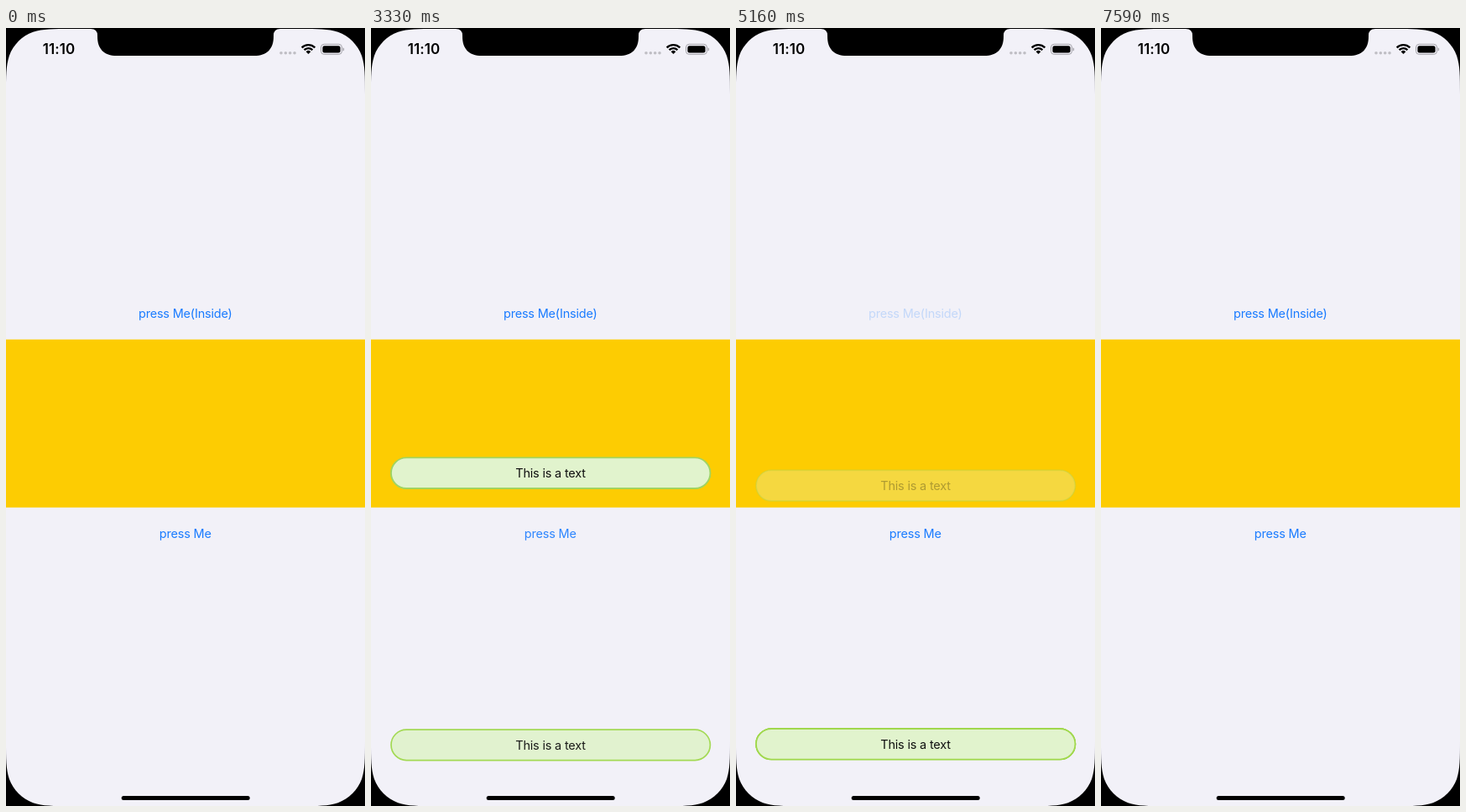
Animation, 428 px wide and 926 px high, one loop 7980 ms. Source, as an HTML page with a canvas:

```html
<!DOCTYPE html>
<html lang="en">
<head>
<meta charset="utf-8">
<title>Toast demo</title>
<style>
  html, body { margin: 0; width: 100%; height: 100%; overflow: hidden; background: #000; }
  canvas { display: block; width: 428px; height: 926px; }
</style>
</head>
<body>
<canvas id="stage"></canvas>
<script>
const W = 428, H = 926, LOOP = 7980;
const BG = '#f2f1f8', BLUE = '#197bff';
const FONT = 'Inter, Roboto, sans-serif';
const ENTER = 300, SLIDE = 21.5;

const canvas = document.getElementById('stage');
const ctx = canvas.getContext('2d');
const dpr = window.devicePixelRatio || 1;
canvas.width = W * dpr;
canvas.height = H * dpr;

// Each toast: start of entry, start of exit, length of exit (ms).
const inner = {
  y: 529.7, border: '#a0d462',
  toasts: [[1380, 3750, 350], [1805, 3890, 280], [5044, 7230, 350]]
};
const outer = {
  y: 852.3, border: '#a0d84c',
  toasts: [[3078, 5260, 350], [3800, 6083, 350], [4115, 6370, 240]]
};

const clamp = x => Math.max(0, Math.min(1, x));
const ease = x => x < 0.5 ? 2 * x * x : 1 - 2 * (1 - x) * (1 - x);

function shown(t, [start, end, exit]) {
  return ease(clamp((t - start) / ENTER)) * (1 - ease(clamp((t - end) / exit)));
}

// A tap dims the label quickly, then lets it recover.
function labelAlpha(t, toasts) {
  return Math.min(...toasts.map(([start]) => {
    const d = t - start;
    if (d < 0 || d > 270) return 1;
    return d < 115 ? 1 - 0.8 * d / 115 : 0.2 + 0.8 * (d - 115) / 155;
  }));
}

function text(str, x, y, color, size = 14.5, weight = 400, spacing = -0.2) {
  ctx.font = `${weight} ${size}px ${FONT}`;
  ctx.letterSpacing = spacing + 'px';
  ctx.textAlign = 'center';
  ctx.textBaseline = 'alphabetic';
  ctx.fillStyle = color;
  ctx.fillText(str, x, y);
}

function pill(x, y, w, h, r) {
  ctx.beginPath();
  ctx.roundRect(x, y, w, h, r);
}

// One smooth screen corner; sx and sy mirror it into place.
function corner(cx, cy, sx, sy) {
  const r = 51;
  const p = (x, y) => [cx + sx * x * r, cy + sy * y * r];
  ctx.beginPath();
  ctx.moveTo(...p(-0.1, -0.1));
  ctx.lineTo(...p(1.529, -0.1));
  ctx.lineTo(...p(1.529, 0));
  ctx.bezierCurveTo(...p(1.089, 0), ...p(0.868, 0), ...p(0.632, 0.075));
  ctx.bezierCurveTo(...p(0.373, 0.169), ...p(0.169, 0.373), ...p(0.075, 0.632));
  ctx.bezierCurveTo(...p(0, 0.868), ...p(0, 1.089), ...p(0, 1.529));
  ctx.lineTo(...p(-0.1, 1.529));
  ctx.fill();
}

function drawBezel() {
  ctx.fillStyle = '#000';
  ctx.fillRect(0, 0, W, 1);
  corner(0, 1, 1, 1);
  corner(W, 1, -1, 1);
  corner(0, H, 1, -1);
  corner(W, H, -1, -1);

  ctx.beginPath();
  ctx.moveTo(101, 0);
  ctx.lineTo(101, 1);
  ctx.quadraticCurveTo(109, 1, 109, 9);
  ctx.lineTo(109, 10);
  ctx.bezierCurveTo(109, 25, 117, 33, 132, 33);
  ctx.lineTo(296, 33);
  ctx.bezierCurveTo(311, 33, 319, 25, 319, 10);
  ctx.lineTo(319, 9);
  ctx.quadraticCurveTo(319, 1, 327, 1);
  ctx.lineTo(327, 0);
  ctx.fill();
}

function drawStatus() {
  text('11:10', 63, 31.3, '#000', 17, 600, 0.1);

  ctx.fillStyle = '#bfbec4';
  for (let i = 0; i < 4; i++) {
    ctx.beginPath();
    ctx.arc(328 + i * 5.35, 29.7, 1.8, 0, 7);
    ctx.fill();
  }

  const up = -Math.PI / 2, half = 0.8, x = 360.5, y = 31;
  ctx.strokeStyle = ctx.fillStyle = '#000';
  ctx.lineWidth = 2.4;
  for (const r of [10.9, 6.9]) {
    ctx.beginPath();
    ctx.arc(x, y, r, up - half, up + half);
    ctx.stroke();
  }
  ctx.beginPath();
  ctx.moveTo(x, y);
  ctx.arc(x, y, 4, up - half, up + half);
  ctx.fill();

  pill(375.5, 19.3, 25, 12, 3.7);
  ctx.strokeStyle = '#a3a2a8';
  ctx.lineWidth = 1;
  ctx.stroke();
  pill(377.4, 21.2, 21.2, 8.2, 2.2);
  ctx.fill();
  ctx.fillStyle = '#a3a2a8';
  pill(401.7, 23.4, 1.4, 4, [0, 1.4, 1.4, 0]);
  ctx.fill();
}

function drawToasts(t, { y, border, toasts }) {
  for (const toast of toasts) {
    const p = shown(t, toast);
    if (p <= 0) continue;
    const cy = y + SLIDE * (1 - p);
    ctx.globalAlpha = p;
    pill(24, cy - 18.2, 380.4, 36.4, 18.2);
    ctx.fillStyle = '#e1f3cd';
    ctx.fill();
    ctx.strokeStyle = border;
    ctx.lineWidth = 1.7;
    ctx.stroke();
    text('This is a text', 214, cy + 5.3, '#101010');
  }
  ctx.globalAlpha = 1;
}

function drawLabel(str, y, alpha) {
  ctx.globalAlpha = alpha;
  text(str, 213.8, y, BLUE);
  ctx.globalAlpha = 1;
}

function draw(t) {
  ctx.setTransform(dpr, 0, 0, dpr, 0, 0);
  ctx.fillStyle = BG;
  ctx.fillRect(0, 0, W, H);
  ctx.fillStyle = '#fdcc02';
  ctx.fillRect(0, 370.7, W, 200);

  drawLabel('press Me(Inside)', 345.2, labelAlpha(t, inner.toasts));
  drawLabel('press Me', 607.2, labelAlpha(t, outer.toasts));
  drawToasts(t, inner);
  drawToasts(t, outer);

  drawBezel();
  drawStatus();
  ctx.fillStyle = '#000';
  pill(137.7, 914, 153, 5, 2.5);
  ctx.fill();
}

const began = performance.now();
function frame() {
  draw((performance.now() - began) % LOOP);
  requestAnimationFrame(frame);
}
frame();
</script>
</body>
</html>
```
